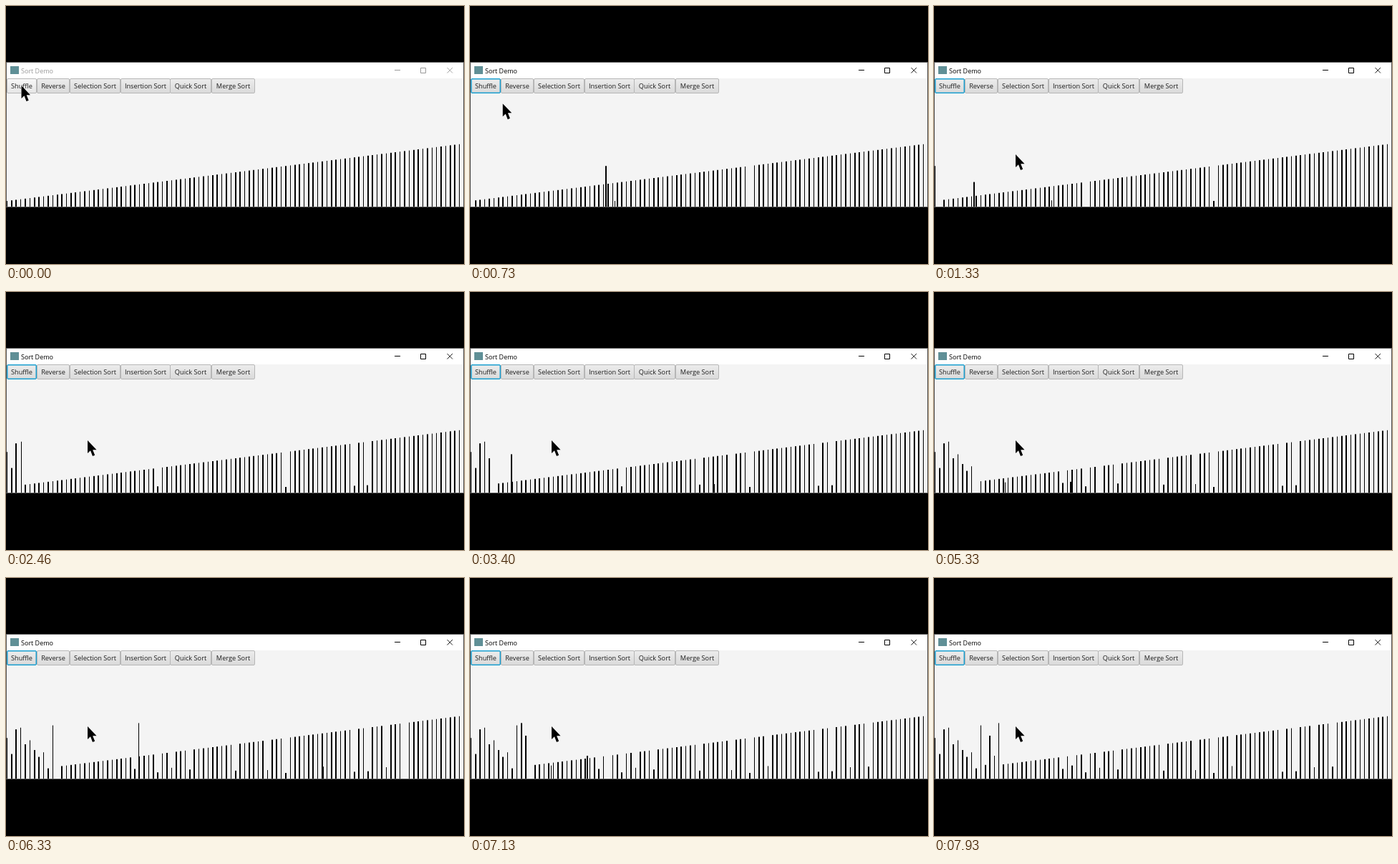
An HTML page with a canvas for the animation above (8 s loop, 640 by 360 pixels).

```html
<!DOCTYPE html>
<html lang="en">
<head>
<meta charset="utf-8">
<title>Sort Demo</title>
<style>
html, body { margin: 0; width: 100%; height: 100%; overflow: hidden; background: #000; }
#stage { position: relative; width: 640px; height: 360px; overflow: hidden; font: 9.2px/19px "Open Sans", "Noto Sans", sans-serif; color: #1c1c1c; }
#stage > * { position: absolute; }
#window { left: 0; top: 78px; width: 638px; height: 201px; border: 1px solid #555; background: #f4f4f4; }
#bar { left: 1px; top: 79px; width: 638px; height: 22px; background: #fff; color: #000; }
#bar.idle { color: #999; }
#bar > * { position: absolute; }
#icon { left: 5px; top: 5px; width: 12px; height: 11px; background: #5f8f96; }
#title { left: 20px; top: 2px; font-size: 9px; white-space: nowrap; }
#controls { left: 0; top: 0; }
.button { top: 101px; height: 21px; box-sizing: border-box; border: 1px solid #b6b6b6; border-radius: 2px; background: linear-gradient(#ececec, #dadada); text-align: center; white-space: nowrap; }
.button.hover { background: linear-gradient(#f7f7f7, #e6e6e6); }
.button.pressed { background: linear-gradient(#d2d2d2, #c6c6c6); }
.button.focus { border-color: #1b9fd0; box-shadow: inset 0 0 0 .5px #1b9fd0; }
canvas { left: 0; top: 0; }
</style>
</head>
<body>
<div id="stage">
  <div id="window"></div>
  <div id="bar">
    <div id="icon"></div>
    <div id="title">Sort Demo</div>
    <svg id="controls" width="638" height="22" fill="none" stroke="currentColor">
      <path d="M542 10.5h8M578.5 7.5h7v7h-7z"/>
      <path d="M615.5 7l7.5 7.5m0-7.5l-7.5 7.5" stroke-width=".9"/>
    </svg>
  </div>
  <canvas width="640" height="360"></canvas>
</div>
<script>
const LOOP = 8000, FRAME = 200 / 3, LAST = 119;
const COUNT = 100, PITCH = 6.385, LEFT = 0.7, WIDTH = 1.6, FLOOR = 280;
const FIRST_SWAP = 477, SWAP_TIME = 500;
const ACTIVATE = 330, PRESS = 360, MOVE_START = 560, MOVE_END = 1120;
// Slot k trades places with slot PARTNERS[k].
const PARTNERS = [61, 33, 76, 79, 50, 57, 40, 28, 36, 36, 83, 87, 65, 30, 11];
const BUTTONS = [
  ["Shuffle", 1, 43], ["Reverse", 43, 89], ["Selection Sort", 89, 160],
  ["Insertion Sort", 160, 230], ["Quick Sort", 229, 287], ["Merge Sort", 287, 348]
];

const stage = document.getElementById("stage");
const titleBar = document.getElementById("bar");
const canvas = document.querySelector("canvas");
const ctx = canvas.getContext("2d");

const buttons = BUTTONS.map(([label, left, right]) => {
  const el = document.createElement("div");
  el.className = "button";
  el.textContent = label;
  el.style.left = left + "px";
  el.style.width = right - left + "px";
  stage.insertBefore(el, canvas);
  return el;
});

const clamp = v => Math.max(0, Math.min(1, v));
const lerp = (a, b, p) => a + (b - a) * p;

// Linear middle with quadratic ramps over the first and last fifth.
function easeBoth(t) {
  if (t < 0.2) return 3.125 * t * t;
  if (t > 0.8) return 1 - 3.125 * (1 - t) * (1 - t);
  return 1.25 * t - 0.125;
}

// Bar edges snap to whole pixels, so bars are one or two pixels wide.
function drawBar(slot, value) {
  const x = LEFT + slot * PITCH, height = 8 + 0.8 * value;
  const left = Math.round(x), right = Math.round(x + WIDTH);
  ctx.fillRect(left, FLOOR - height, right - left, height);
}

function drawBars(time) {
  const order = Array.from({ length: COUNT }, (_, i) => i);
  const slots = order.slice();
  PARTNERS.forEach((j, i) => {
    const p = clamp((time - FIRST_SWAP - i * SWAP_TIME) / SWAP_TIME);
    if (p <= 0) return;
    const a = order[i], b = order[j], e = easeBoth(p);
    slots[a] = lerp(i, j, e);
    slots[b] = lerp(j, i, e);
    order[i] = b;
    order[j] = a;
  });
  ctx.fillStyle = "#000";
  slots.forEach(drawBar);
}

const arrow = new Path2D("M0 0V18L4 14.3L7 22L10.2 20.7L7.2 13.2H12.6Z");

function drawCursor(time) {
  const p = easeBoth(clamp((time - MOVE_START) / (MOVE_END - MOVE_START)));
  ctx.save();
  ctx.translate(lerp(21.5, 114, p), lerp(111, 207, p));
  ctx.strokeStyle = "#fff";
  ctx.lineWidth = 1;
  ctx.stroke(arrow);
  ctx.fill(arrow);
  ctx.restore();
}

function draw(time) {
  const shuffle = buttons[0].classList;
  titleBar.classList.toggle("idle", time < ACTIVATE);
  shuffle.toggle("focus", time >= PRESS);
  shuffle.toggle("pressed", time >= PRESS && time < FIRST_SWAP);
  shuffle.toggle("hover", time < MOVE_START + 140);
  ctx.clearRect(0, 0, 640, 360);
  drawBars(time);
  drawCursor(time);
}

const start = performance.now();
function tick() {
  const t = (performance.now() - start) % LOOP;
  draw(Math.min(LAST, Math.floor((t + 6.7) / FRAME)) * FRAME);
  requestAnimationFrame(tick);
}
tick();
</script>
</body>
</html>
```
